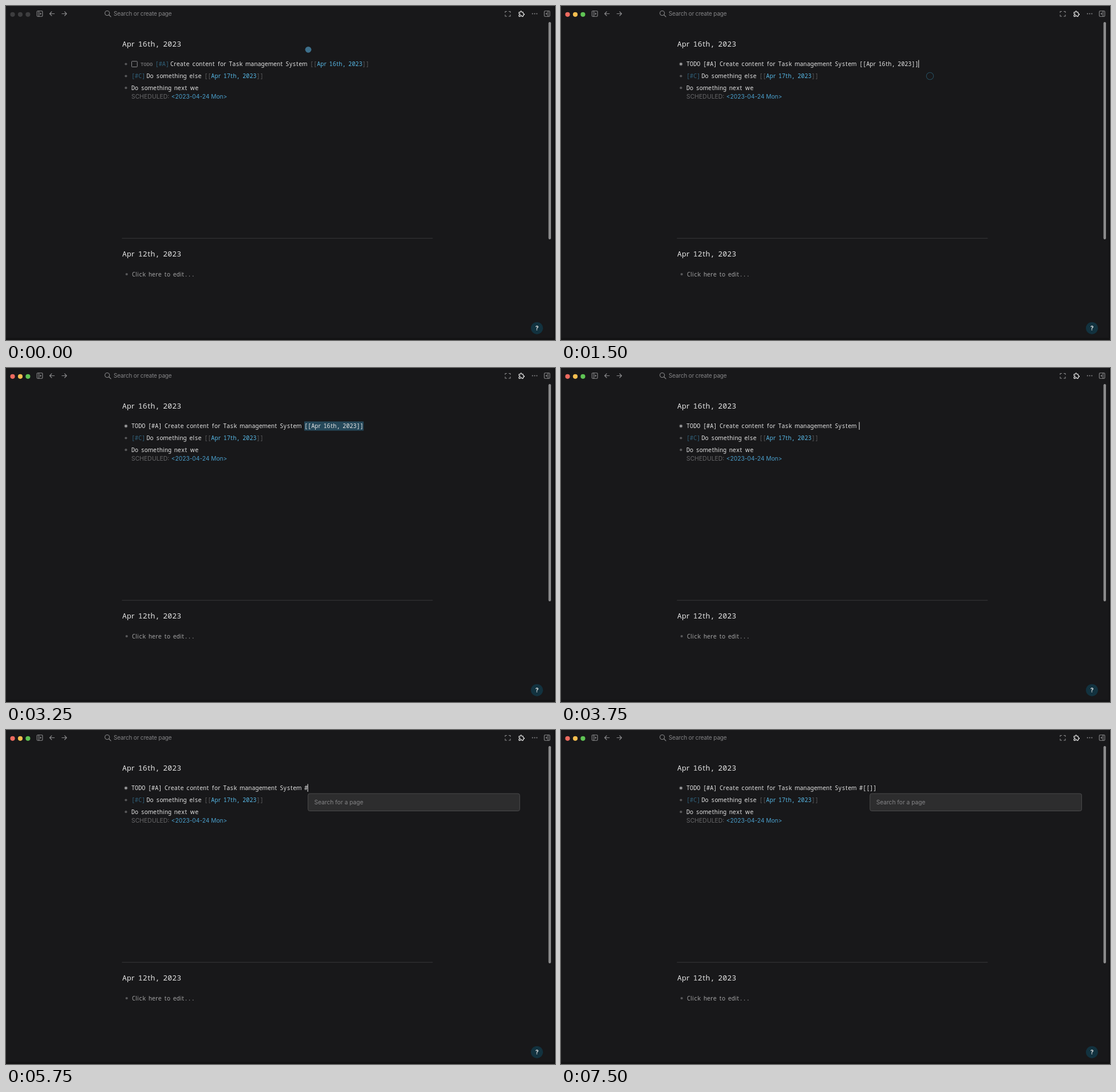
Animation, 959 px wide and 584 px high, one loop 8 s. Source, as an HTML page:

```html
<!DOCTYPE html>
<html lang="en">
<head>
<meta charset="utf-8">
<title>Journal</title>
<style>
  html, body { margin: 0; width: 959px; height: 584px; overflow: hidden; background: #18181a; }
  svg { display: block; }
  text { white-space: pre; }
  .mono { font-family: "Noto Sans Mono", monospace; text-anchor: middle; }
  .mono .p { font-family: "Noto Sans", sans-serif; }
  .sans { font-family: Inter, "Liberation Sans", sans-serif; }
  .line { fill: none; stroke: #8b8b8d; stroke-width: 1.1; stroke-linecap: round; stroke-linejoin: round; }
</style>
</head>
<body>
<svg id="stage" width="959" height="584" viewBox="0 0 959 584"></svg>
<script>
const LOOP = 8000;
const UNIT = 6.1;            // width of a normal character cell in body text
const TEXT = '#e2e2e2', DIM = '#5c5c5e', LINK = '#56b5e2', TAG = '#306079';
const stage = document.getElementById('stage');

// Cell widths of the near-monospaced face, in units.
const cell = c => /[mwMW]/.test(c) ? 1.5 : /[frt ]/.test(c) ? 0.75 : /[il]/.test(c) ? 0.5 : 1;
const widthOf = (s, unit = UNIT) => [...s].reduce((sum, c) => sum + cell(c) * unit, 0);
const escape = s => s.replace(/&/g, '&amp;').replace(/</g, '&lt;');

function mono(s, x, y, fill = TEXT, unit = UNIT, weight = 400) {
  let chars = '';
  for (const c of s) {
    const w = cell(c) * unit;
    chars += `<tspan x="${(x + w / 2).toFixed(2)}"${cell(c) === 1 ? '' : ' class="p"'}>${escape(c)}</tspan>`;
    x += w;
  }
  return `<text class="mono" y="${y}" fill="${fill}" font-size="${unit / 0.6}" font-weight="${weight}">${chars}</text>`;
}

// Runs of [string, colour] set one after the other.
function runs(x, y, list) {
  return list.map(([s, fill]) => {
    const out = mono(s, x, y, fill);
    x += widthOf(s);
    return out;
  }).join('');
}

const sans = (s, x, y, fill, size, spacing = 0) =>
  `<text class="sans" x="${x}" y="${y}" fill="${fill}" font-size="${size}" letter-spacing="${spacing}">${escape(s)}</text>`;
const rect = (x, y, w, h, fill, rx = 0, extra = '') =>
  `<rect x="${x}" y="${y}" width="${w}" height="${h}" rx="${rx}" fill="${fill}" ${extra}/>`;
const disc = (x, y, r, fill, extra = '') =>
  `<circle cx="${x}" cy="${y}" r="${r}" fill="${fill}" ${extra}/>`;
const line = (d, extra = '') => `<path class="line" d="${d}" ${extra}/>`;
const bullet = (x, y) => disc(x, y, 2.1, '#58585a');
const pageLink = (date, after = '') => [['[[', DIM], [date, LINK], [']]', DIM]];

const PUZZLE = 'M4 7h3a1 1 0 0 0 1-1v-1a2 2 0 0 1 4 0v1a1 1 0 0 0 1 1h3a1 1 0 0 1 1 1v3a1 1 0 0 0 1 1h1' +
  'a2 2 0 0 1 0 4h-1a1 1 0 0 0-1 1v3a1 1 0 0 1-1 1h-3a1 1 0 0 1-1-1v-1a2 2 0 0 0-4 0v1a1 1 0 0 1-1 1h-3' +
  'a1 1 0 0 1-1-1v-3a1 1 0 0 1 1-1h1a2 2 0 0 0 0-4h-1a1 1 0 0 1-1-1v-3a1 1 0 0 1 1-1';

const panelIcon = x => rect(x, 8.7, 9.6, 9.6, 'none', 1.2, 'class="line"');

const backdrop = [
  rect(0, 0, 959, 584, '#18181a'),
  rect(957.5, 0, 1.5, 584, '#0d0d0e'),
  rect(0, 580.5, 959, 3.5, '#121213'),
  panelIcon(54.2), line('M57.4 8.7V18.3'), '<path d="M59.4 11.3L62 13.5 59.4 15.7Z" fill="#8b8b8d"/>',
  line('M84.5 13.5H76.3M79.8 10L76.3 13.5 79.8 17'),
  line('M97.7 13.5H105.9M102.4 10L105.9 13.5 102.4 17'),
  disc(176.8, 12.5, 4, 'none', 'class="line"'), line('M179.8 15.5L183.2 18.9'),
  sans('Search or create page', 188, 17.2, '#858587', 10, -0.17),
  line('M872 11.5V9.5H874.5M878.5 9.5H881V11.5M881 15.5V18H878.5M874.5 18H872V15.5'),
  line(PUZZLE, 'transform="translate(894.4 7.2) scale(.53)" style="stroke:#e4e4e4;stroke-width:2.2"'),
  [919.7, 923.5, 927.3].map(x => disc(x, 13.6, 1, '#8b8b8d')).join(''),
  panelIcon(940.3), line('M946.8 8.7V18.3'), '<path d="M945 11.3L942.4 13.5 945 15.7Z" fill="#8b8b8d"/>',
  rect(947.6, 28, 4.4, 380, '#8b8b8c', 2.2),
  mono('Apr 16th, 2023', 203, 70.6, TEXT, 7.93),
  bullet(209.5, 122.5),
  runs(219, 126, [['[#C]', TAG]]),
  runs(245.5, 126, [['Do something else ', TEXT], ...pageLink('Apr 17th, 2023')]),
  bullet(209.5, 143.2),
  mono('Do something next we', 219, 146.8),
  sans('SCHEDULED:', 219, 162.2, '#68686a', 10.45),
  sans('<2023-04-24 Mon>', 288.8, 162.2, '#4a9fcc', 10.2),
  line('M203 406.2H745', 'style="stroke:#39393b;stroke-width:1"'),
  mono('Apr 12th, 2023', 203, 438.3, TEXT, 7.93),
  bullet(210.8, 469),
  mono('Click here to edit...', 220, 472.7, '#a2a2a3'),
  disc(927.5, 563.3, 10.6, '#12323f'),
  '<text class="sans" x="927.5" y="567" text-anchor="middle" fill="#e6e6e6" font-size="10" font-weight="700">?</text>'
].join('');

function windowButtons(active) {
  const colours = active ? ['#ee6a5f', '#f5be4f', '#5fc454'] : ['#3d3d3f', '#3d3d3f', '#3d3d3f'];
  return colours.map((c, i) => disc(11.5 + i * 13.4, 14.8, 4.1, c)).join('');
}

const renderedTask = [
  bullet(209.5, 101.5),
  rect(219.5, 96.7, 9.8, 9.8, 'none', 0.8, 'stroke="#8d8d8f"'),
  mono('TODO', 235, 104.9, '#666668', 5.35, 700),
  mono('[#A]', 260.6, 105, TAG),
  runs(287, 105, [['Create content for Task management System ', TEXT], ...pageLink('Apr 16th, 2023')])
].join('');

const TASK = 'TODO [#A] Create content for Task management System';
const DATED = TASK + ' [[Apr 16th, 2023]]';

// Editing states: start time, text, caret index (-1 = hidden), selection start, popup.
const edits = [
  { at: 1500, text: DATED, caret: DATED.length },
  { at: 2000, text: DATED, caret: -1 },
  { at: 2500, text: DATED, caret: -1, select: '2023]]' },
  { at: 2750, text: DATED, caret: -1, select: ', 2023]]' },
  { at: 3000, text: DATED, caret: -1, select: 'Apr 16th, 2023]]' },
  { at: 3250, text: DATED, caret: -1, select: '[[Apr 16th, 2023]]' },
  { at: 3750, text: TASK + ' ', caret: TASK.length + 1 },
  { at: 4000, text: TASK, caret: TASK.length },
  { at: 4750, text: TASK + ' ', caret: TASK.length + 1 },
  { at: 5250, text: TASK + ' ', caret: -1 },
  { at: 5750, text: TASK + ' #', caret: TASK.length + 2, popup: 'search', indent: 2 },
  { at: 6250, text: TASK + ' #', caret: -1, popup: 'search', indent: 2 },
  { at: 6750, text: TASK + ' #[', caret: TASK.length + 3, popup: 'create', indent: 2 },
  { at: 7000, text: TASK + ' #[[]]', caret: TASK.length + 4, popup: 'search', indent: 4 },
  { at: 7500, text: TASK + ' #[[]]', caret: -1, popup: 'search', indent: 4 }
];

const pointer = [
  { at: 0, x: 528, y: 76.3 },
  { at: 250, x: 548.5, y: 78.3 },
  { at: 500, x: 646.8, y: 98.3 },
  { at: 750, x: 647, y: 98, ring: true },
  { at: 1000, x: 645.5, y: 110.5, ring: true },
  { at: 1250, x: 644, y: 123.3, ring: true },
  { at: 1500, x: 644.5, y: 122.5, ring: true },
  { at: 1750, x: 644.6, y: 106, ring: true },
  { at: 2500, hidden: true }
];

const current = (steps, t) => steps.filter(s => s.at <= t).pop();

function popup(kind, x) {
  const box = h => rect(x + 0.5, 111.2, 369.8, h, '#2d2d2e', 3, 'stroke="#4b4b4c"');
  if (kind === 'search') return box(30.3) + sans('Search for a page', x + 11.4, 130.3, '#858587', 10.2);
  return box(35.3) + rect(x + 3.7, 117, 361, 24.2, '#3880b5', 3) +
    mono('New page: ', x + 14, 133.2, '#f0f0f0', 6.5) +
    rect(x + 79, 122.3, 6.4, 14, '#1d2a34', 1) +
    mono('[', x + 79, 133.2, '#f0f0f0', 6.5, 700);
}

function editor({ text, caret, select, popup: kind, indent }) {
  const x = 219;
  let out = disc(209.5, 101.5, 3.1, '#4b4b4d') + disc(209.5, 101.5, 2, '#a0a0a2');
  if (select) {
    const w = widthOf(select);
    out += rect(x + widthOf(text) - w, 93.5, w, 16, '#25485a');
  }
  out += mono(text, x, 105);
  if (caret >= 0) out += rect(x + widthOf(text.slice(0, caret)) - 0.4, 94.5, 1, 13.5, '#f0f0f0');
  if (kind) out += popup(kind, x + widthOf((TASK + ' #[[').slice(0, TASK.length + indent)));
  return out;
}

function drawPointer({ x, y, ring, hidden }) {
  if (hidden) return '';
  return ring ? disc(x, y, 6.2, 'none', 'stroke="#254c5d" stroke-width="1.1"') : disc(x, y, 5.4, '#3d6f8b');
}

stage.innerHTML = backdrop + '<g id="live"></g>';
const live = document.getElementById('live');
let shown = '';

function render(t) {
  const edit = current(edits, t);
  const picture = windowButtons(t >= 1000) + (edit ? editor(edit) : renderedTask) + drawPointer(current(pointer, t));
  if (picture !== shown) live.innerHTML = shown = picture;
}

const start = performance.now();
function tick() {
  render((performance.now() - start) % LOOP);
  requestAnimationFrame(tick);
}
tick();
</script>
</body>
</html>
```
